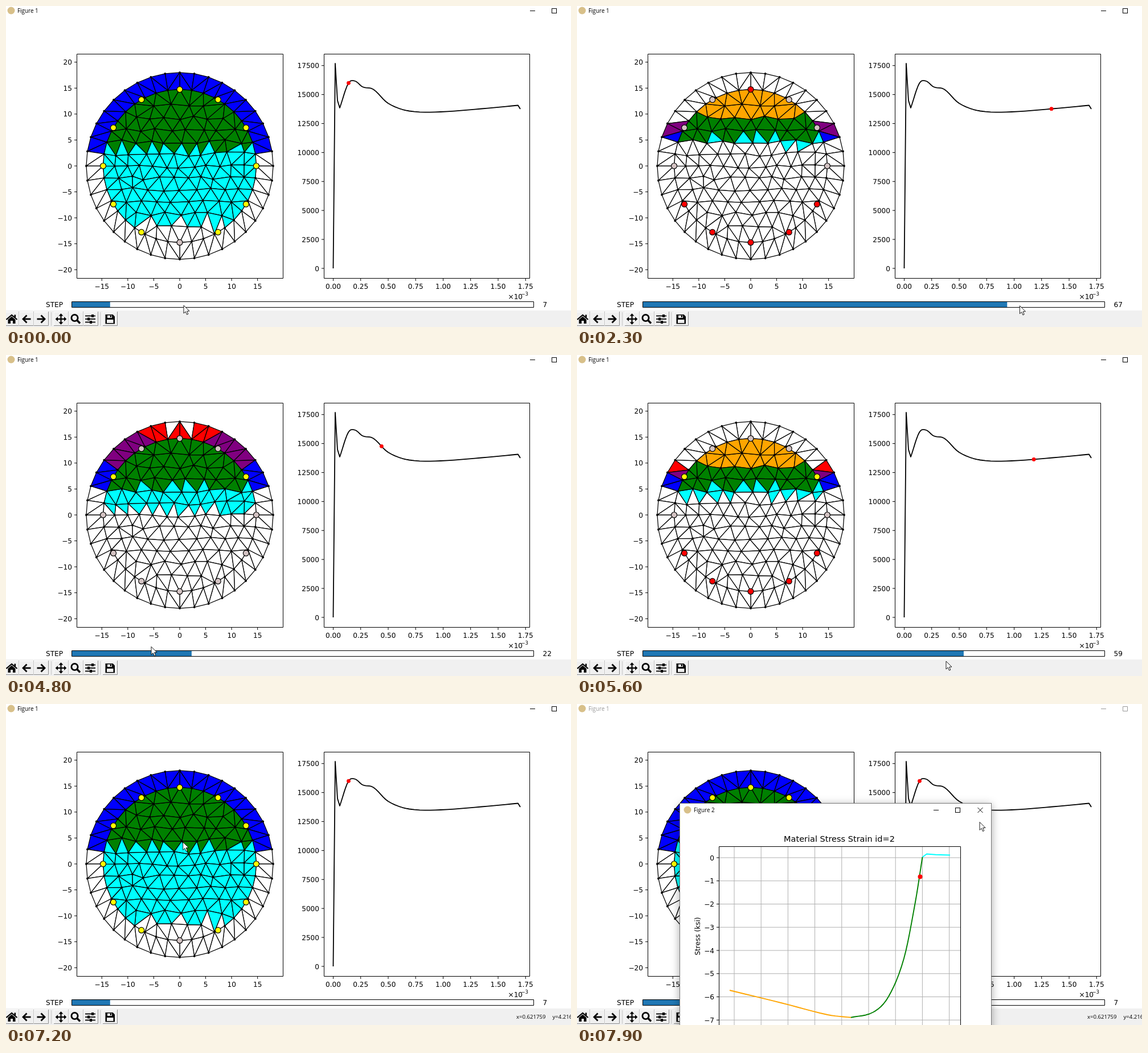
Write an HTML page with a canvas that moves like this. It is 992 px wide and 564 px high and loops after 8000 ms.

```html
<!DOCTYPE html>
<html lang="en">
<head>
<meta charset="utf-8">
<title>Section viewer</title>
<style>
  html, body { margin: 0; width: 100%; height: 100%; overflow: hidden; background: #fff; }
  canvas { display: block; width: 100vw; height: 100vh; }
</style>
</head>
<body>
<canvas id="stage" width="992" height="564"></canvas>
<script>
const ctx = document.getElementById('stage').getContext('2d');
const LOOP = 8000, CX = 305, CY = 281, UNIT = 9.115;
const R_OUT = 18 * UNIT, R_IN = 14.75 * UNIT;
const PLOT = '"DejaVu Sans", sans-serif', UI = '"Open Sans", "Noto Sans", sans-serif';

// time, step
const STEPS = [[0,7],[500,20],[600,20],[800,39],[1200,39],[2900,83],[3200,83],[3300,85],
  [4100,85],[4800,22],[5000,20],[5400,64],[5600,59],[6800,7]];
// time, x, y
const POINTER = [[0,312,526],[800,610,531],[1100,615,527.5],[1200,615,527.5],[3300,925,526],
  [3600,925,526],[4000,543,519],[4800,255,512.5],[5400,715,532],[5600,648,538],[6600,200,530],
  [6900,312,440],[7200,310.66733,242.5708],[7500,310.66733,242.5708],[7900,707,207.5]];

// Each colour holds above its compressive strain; the last one fills the rest
const COVER = [[0.00489,'#fff'],[0.0042,'#f00'],[0.00188,'#800080'],[-0.0001,'#00f'],[-1,'#fff']];
const CORE = [[0.0142,'#000'],[0.0052,'#ffa500'],[0,'#008000'],[-0.002,'#0ff'],[-1,'#fff']];
const BAR = [[0.0125,'#f00'],[0.00235,'#d3c3c3'],[0,'#ff0']];

// Linear interpolation over rows whose first column is the key
function at(rows, k) {
  const i = Math.max(1, rows.findIndex(r => k <= r[0]));
  const a = rows[i - 1], b = rows[i];
  if (k >= rows[rows.length - 1][0]) return rows[rows.length - 1].slice(1);
  const f = (k - a[0]) / (b[0] - a[0]);
  return a.slice(1).map((v, j) => v + (b[j + 1] - v) * f);
}

// Smooth curve through a few points
function smooth(keys) {
  const slope = i => {
    const a = keys[Math.max(0, i - 1)], b = keys[Math.min(keys.length - 1, i + 1)];
    return (b[1] - a[1]) / (b[0] - a[0]);
  };
  const out = [keys[0]];
  for (let i = 0; i < keys.length - 1; i++) {
    const [x0, y0] = keys[i], [x1, y1] = keys[i + 1], w = x1 - x0;
    for (let n = 1; n <= 6; n++) {
      const u = n / 6, v = 1 - u;
      out.push([x0 + w * u, v * v * ((1 + 2 * u) * y0 + u * w * slope(i))
        + u * u * ((1 + 2 * v) * y1 - v * w * slope(i + 1))]);
    }
  }
  return out;
}

const MOMENT = [[574.5,461],[578,101],[582,166],
  ...smooth([[586,179],[601,136],[613,132],[626,142],[645,146.5],[671,171],[708,184.5],
    [763,186],[835,180.5],[899,174.5]]), [903,181]];
const CRUSHED = smooth([[268,503],[360,525.5],[440,546],[481,550.8]]);
const LOADED = smooth([[481,550.8],[520,541.5],[547,514],[574,447],[594,348],[606.5,269]]);

const polar = (r, deg) => {
  const a = deg * Math.PI / 180;
  return [CX + r * Math.sin(a), CY - r * Math.cos(a)];
};

let seed = 11;
const jitter = size => {
  seed = seed * 16807 % 2147483647;
  return (seed / 2147483647 - 0.5) * 2 * size;
};

// Staggered rows with a little noise
function fillCore() {
  const points = [], radius = R_IN - 21.5;
  for (let row = 0; row < 11; row++) {
    const y = CY + (row - 5) * 21;
    const half = Math.sqrt(radius ** 2 - (y - CY) ** 2);
    const odd = (row + 1) % 2;
    const n = 2 * Math.round((half / 12.5 - odd) / 2) + odd;
    for (let i = 0; i <= n; i++) {
      points.push([CX - half + 2 * half * i / n + jitter(4), y + jitter(4)]);
    }
  }
  return points;
}

function inCircle([a, b, c], p) {
  const [ax, ay, bx, by, cx, cy] = [a, b, c].flatMap(q => [q[0] - p[0], q[1] - p[1]]);
  const det = (ax * ax + ay * ay) * (bx * cy - cx * by)
    - (bx * bx + by * by) * (ax * cy - cx * ay)
    + (cx * cx + cy * cy) * (ax * by - bx * ay);
  const turn = (b[0] - a[0]) * (c[1] - a[1]) - (b[1] - a[1]) * (c[0] - a[0]);
  return det * turn > 0;
}

// Incremental Delaunay triangulation
function triangulate(points) {
  const frame = [[-20000, -15000], [20600, -15000], [300, 25000]];
  let tris = [frame];
  for (const p of points) {
    const bad = tris.filter(t => inCircle(t, p));
    const edges = bad.flatMap(([a, b, c]) => [[a, b], [b, c], [c, a]]);
    const rim = edges.filter(e => !edges.some(f => f[0] === e[1] && f[1] === e[0]));
    tris = tris.filter(t => !bad.includes(t)).concat(rim.map(e => [e[0], e[1], p]));
  }
  return tris.filter(t => !t.some(p => frame.includes(p)));
}

const ring = r => Array.from({ length: 40 }, (_, i) => polar(r, i * 9));
const outer = ring(R_OUT), inner = ring(R_IN), inside = fillCore();
const nodes = [...outer, ...inner, ...inside];
const core = triangulate([...inside, ...inner]);
const cover = [];
for (const side of [1, -1]) {
  for (let i = 0; i < 20; i++) {
    const a = (40 + side * i) % 40, b = (40 + side * (i + 1)) % 40;
    if (i === 0) cover.push([outer[a], outer[b], inner[b]], [outer[a], inner[a], inner[b]]);
    else cover.push([outer[a], outer[b], inner[a]], [inner[a], inner[b], outer[b]]);
  }
}

function path(points, close) {
  ctx.beginPath();
  points.forEach(p => ctx.lineTo(p[0], p[1]));
  if (close) ctx.closePath();
}
function line(points, color, width) {
  path(points);
  ctx.strokeStyle = color;
  ctx.lineWidth = width;
  ctx.stroke();
}
function shape(points, color) {
  path(points, true);
  ctx.fillStyle = color;
  ctx.fill();
}
function rect(x, y, w, h, color) {
  ctx.fillStyle = color;
  ctx.fillRect(x, y, w, h);
}
function box(x, y, w, h, color = '#000') {
  ctx.strokeStyle = color;
  ctx.lineWidth = 1;
  ctx.strokeRect(x, y, w, h);
}
function disc(x, y, r, fill, edge) {
  ctx.beginPath();
  ctx.arc(x, y, r, 0, 7);
  ctx.fillStyle = fill;
  ctx.fill();
  if (edge) {
    ctx.strokeStyle = edge;
    ctx.lineWidth = 1.2;
    ctx.stroke();
  }
}
function text(s, x, y, size, align = 'left', color = '#000', family = PLOT) {
  ctx.font = size + 'px ' + family;
  ctx.textAlign = align;
  ctx.fillStyle = color;
  ctx.fillText(s, x, y);
}
const num = v => String(v).replace('-', '\u2212');

function xTick(x, label) {
  line([[x, 479], [x, 483]], '#000', 1);
  text(label, x, 496.5, 12.1, 'center');
}
function yTick(x, y, label) {
  line([[x - 4, y], [x, y]], '#000', 1);
  text(label, x - 8, y + 4.5, 12.1, 'right');
}

function mesh(step) {
  // Plane sections: strain grows linearly from the neutral axis
  const axis = 231.6 + 18.4 * Math.exp((7 - step) / 3) + 5.4 * (step / 85) ** 10;
  const strain = y => (axis - y) / UNIT * step * 2e-5;
  const pick = (scale, e) => scale.find(s => e > s[0])[1];
  ctx.lineJoin = 'round';
  for (const [tris, scale] of [[cover, COVER], [core, CORE]]) {
    for (const t of tris) {
      shape(t, pick(scale, strain((t[0][1] + t[1][1] + t[2][1]) / 3)));
      ctx.strokeStyle = '#000';
      ctx.lineWidth = 1.25;
      ctx.stroke();
    }
  }
  nodes.forEach(p => disc(p[0], p[1], 1.9, '#000'));
  for (let deg = 0; deg < 360; deg += 30) {
    const [x, y] = polar(R_IN, deg);
    disc(x, y, 5, pick(BAR, Math.abs(strain(y))), '#000');
  }
}

function plots(step) {
  mesh(step);
  box(124.5, 84.5, 362, 394);
  for (let v = -15; v <= 15; v += 5) xTick(CX + v * UNIT, num(v));
  for (let v = -20; v <= 20; v += 5) yTick(124, CY - v * UNIT, num(v));

  ctx.lineJoin = 'round';
  line(MOMENT, '#000', 1.8);
  const x = 574.5 + step * 3.858;
  disc(x, at(MOMENT, x)[0], 3.4, '#f00');
  box(558.5, 84.5, 361, 394);
  for (let i = 0; i < 8; i++) {
    xTick(574.5 + i * 48.25, (i / 4).toFixed(2));
    yTick(558, 461 - i * 50.9, String(i * 2500));
  }
  text('×10', 881.5, 514.5, 12.1);
  text('\u22123', 904.5, 509, 8.5);
}

function slider(step) {
  rect(116, 520, 811, 10, '#fff');
  rect(116, 520, step * 811 / 85, 10, '#1f77b4');
  box(115.5, 519.5, 811, 10);
  text('STEP', 100, 528.5, 12.1, 'right');
  text(step, 942.5, 528.5, 12.1);
}

function arrow(x, dir) {
  line([[x - 7 * dir, 550], [x + 6 * dir, 550]], '#000', 2.8);
  line([[x, 543.5], [x + 6.5 * dir, 550], [x, 556.5]], '#000', 2.8);
}

function toolbar() {
  rect(0, 535, 992, 29, '#f0f0f0');
  for (const x of [-3, 23, 49, 84, 110, 136, 170]) {
    line([[x, 562], [x, 537.5], [x + 25, 537.5]], '#fff', 1);
    line([[x, 561.5], [x + 25.5, 561.5], [x + 25.5, 537]], '#8c8c8c', 1);
  }
  for (const x of [79.5, 165.5]) line([[x, 538], [x, 562]], '#c8c8c8', 1);
  ctx.lineJoin = 'miter';

  // home
  line([[0.5, 551], [10, 543], [19.5, 551]], '#000', 2.2);
  rect(14.5, 542.5, 2.6, 5, '#000');
  shape([[3.5, 551], [10, 545.5], [16.5, 551], [16.5, 558], [3.5, 558]], '#000');
  rect(8, 553, 4, 5, '#f0f0f0');
  arrow(36.5, -1);
  arrow(61.5, 1);

  // pan
  for (let i = 0; i < 4; i++) {
    ctx.save();
    ctx.translate(96.5, 550);
    ctx.rotate(i * Math.PI / 2);
    line([[0, 0], [7, 0]], '#000', 2.2);
    shape([[9.8, 0], [5.5, -4], [5.5, 4]], '#000');
    ctx.restore();
  }

  // zoom
  ctx.beginPath();
  ctx.arc(120.5, 548, 5.6, 0, 7);
  ctx.lineWidth = 2.8;
  ctx.stroke();
  line([[124.5, 552], [130, 557.5]], '#000', 3.4);

  // settings
  [150, 143, 147].forEach((x, i) => {
    const y = 544.5 + i * 5.5;
    line([[139, y], [157, y]], '#000', 1.8);
    rect(x, y - 2.5, 4, 5, '#000');
  });

  // save
  shape([[174.5, 542], [187.5, 542], [191, 545.5], [191, 558.5], [174.5, 558.5]], '#000');
  rect(178, 543.5, 8, 4.5, '#f0f0f0');
  rect(182.8, 543.5, 2.2, 3.5, '#000');
  rect(177, 551, 11.5, 6, '#f0f0f0');
}

function caption(x, y, label, color, minX, maxX) {
  disc(x, y, 6.5, '#d8c08a');
  text(label, x + 11, y + 4.2, 9.9, 'left', color, UI);
  line([[minX, y + 0.5], [minX + 9, y + 0.5]], color, 1);
  box(maxX + 0.5, y - 3.5, 8, 8, color);
}

function popup() {
  ctx.save();
  ctx.shadowColor = 'rgba(0,0,0,.35)';
  ctx.shadowBlur = 14;
  ctx.shadowOffsetY = 3;
  rect(180, 174, 548, 420, '#fff');
  ctx.restore();
  box(180.5, 174.5, 547, 420, '#777');
  caption(194, 186, 'Figure 2', '#000', 626, 664);
  line([[703.5, 182], [712.5, 191]], '#000', 1);
  line([[712.5, 182], [703.5, 191]], '#000', 1);
  text('Material Stress Strain id=2', 460.5, 241.5, 14.5, 'center');

  for (let i = 0; i < 9; i++) line([[276 + i * 47.2, 250], [276 + i * 47.2, 564]], '#b0b0b0', 1);
  for (let i = 0; i < 8; i++) {
    const y = 270 + i * 40.75;
    line([[249, y], [673, y]], '#b0b0b0', 1);
    yTick(249, y, num(-i));
  }
  ctx.lineJoin = 'round';
  line(CRUSHED, '#ffa500', 1.9);
  line([[606.5, 269], [614, 263.5], [630, 264.7], [655, 265.5]], '#0ff', 1.9);
  line(LOADED, '#008000', 1.9);
  disc(602.5, 303.5, 4, '#f00');
  box(249.5, 250.5, 424, 350);

  ctx.save();
  ctx.translate(216, 408);
  ctx.rotate(-Math.PI / 2);
  text('Stress (ksi)', 0, 0, 12.1, 'center');
  ctx.restore();
}

function pointer(x, y) {
  const tip = [[0, 0], [0, 14], [3.2, 11], [5.5, 16.2], [7.8, 15.2], [5.6, 10.2], [10, 10]];
  shape(tip.map(p => [x + p[0], y + p[1]]), '#fff');
  ctx.strokeStyle = '#000';
  ctx.lineWidth = 0.9;
  ctx.stroke();
}

function draw(t) {
  const step = Math.round(at(STEPS, t)[0]);
  rect(0, 0, 992, 564, '#fff');
  caption(9, 8, 'Figure 1', t >= 7500 ? '#999' : '#000', 920, 958);
  plots(step);
  slider(step);
  toolbar();
  if (t >= 6800) {
    const [x, y] = at(POINTER, Math.min(t, 7200));
    text('x=' + ((x - CX) / UNIT).toFixed(6), 896, 553, 9.6, 'left', '#000', UI);
    text('y=' + ((CY - y) / UNIT).toFixed(5), 959.5, 553, 9.6, 'left', '#000', UI);
  }
  if (t >= 7600) popup();
  pointer(...at(POINTER, t));
}

function tick() {
  const t = performance.now() % LOOP;
  draw(Math.floor(t / 100) * 100);
  requestAnimationFrame(tick);
}
tick();
</script>
</body>
</html>
```
